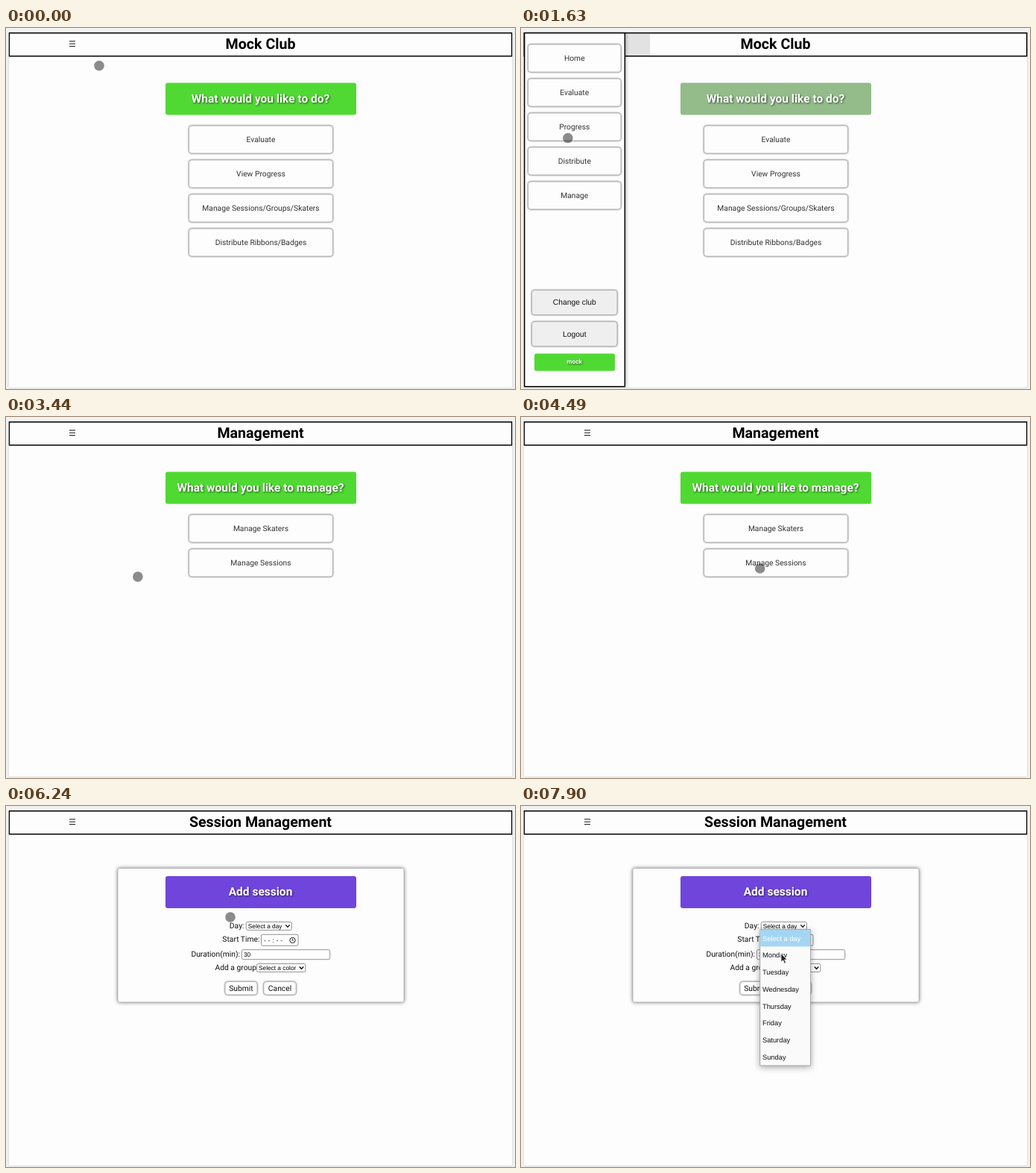
Recreate the animation shown at these times as an HTML page. Size 683x484 px, loop 8000 ms.

```html
<!DOCTYPE html>
<html lang="en">
<head>
<meta charset="utf-8">
<title>Session management</title>
<style>
html, body { margin: 0; height: 100%; overflow: hidden; background: #f2f2f2; }
svg { display: block; width: 100vw; height: 100vh; }
text { font-family: Roboto, sans-serif; text-rendering: geometricPrecision; white-space: pre; }
.ui { font-family: "Liberation Sans", Arial, sans-serif; }
.bold { font-weight: 700; }
.lit { filter: drop-shadow(1.2px 1.2px 1.2px rgba(0,0,0,.6)); }
.box { filter: drop-shadow(0 0 1.3px rgba(0,0,0,.5)); }
.panel { filter: drop-shadow(0 0 2.5px rgba(0,0,0,.5)); }
.list { filter: drop-shadow(0 2px 4px rgba(0,0,0,.35)); }
.dim { filter: blur(.55px) grayscale(.7); }
</style>
</head>
<body>
<svg id="stage" viewBox="0 0 683 484" preserveAspectRatio="none"></svg>
<script>
const GREEN = '#50d933', PURPLE = '#7045dc', PAPER = '#fdfdfd';
const LOOP = 8000;

const rect = (x, y, w, h, fill, more = '') =>
  `<rect x="${x}" y="${y}" width="${w}" height="${h}" fill="${fill}" ${more}/>`;

// y is the middle of the capitals
const text = (s, x, y, size, fill = '#333', cls = '', anchor = 'middle') =>
  `<text x="${x}" y="${y + size * .355}" font-size="${size}" fill="${fill}" class="${cls}" text-anchor="${anchor}">${s}</text>`;

const group = (id, body, more = '') => `<g id="${id}" ${more}>${body}</g>`;

const button = (s, x, y, w, h, fill = PAPER, ink = '#333', cls = '') =>
  rect(x, y, w, h, fill, 'rx="3.5" stroke="#a6a6a6" stroke-width=".8" class="box"') +
  text(s, x + w / 2, y + h / 2 - .2, 10.3, ink, cls);

const banner = (s, y, fill) =>
  rect(214, y, 256, 43, fill, 'rx="3"') + text(s, 341.5, y + 20.8, 15.5, '#fff', 'bold lit');

const header = title =>
  rect(4.3, 6.7, 674.4, 31, 'none', 'stroke="#000" stroke-width="1.5"') +
  text(title, 341.5, 21, 19.6, '#000', 'bold') +
  '<path d="M85 17.8h8M85 21.2h8M85 24.6h8" stroke="#111"/>';

const menuPage = (id, title, question, color, items) =>
  group(id, header(title) + banner(question, 73.5, color) +
    items.map((s, i) => button(s, 245.5, 131 + i * 46, 193, 37)).join(''));

const field = (x, y, w, h) =>
  rect(x, y, w, h, '#fff', 'rx="2" stroke="#777" stroke-width=".8"');

const select = (s, x, y, w) =>
  field(x, y, w, 11) + text(s, x + 2.5, y + 5.6, 8.3, '#000', 'ui', 'start') +
  `<path d="M${x + w - 8} ${y + 4}l2.7 3 2.7-3" fill="none" stroke="#000" stroke-width="1.3"/>`;

const label = (s, x, y) => text(s, x, y, 10.3, '#111', '', 'end');

const form = group('form',
  header('Session Management') +
  rect(150, 83.5, 384, 179.5, PAPER, 'rx="2.5" stroke="#aaa" stroke-width=".8" class="panel"') +
  banner('Add session', 94, PURPLE) +
  label('Day:', 319.5, 160) + select('Select a day', 322.3, 155.4, 61) +
  label('Start Time:', 340.5, 178.3) + field(342.5, 172.3, 49.5, 15) +
  `<g letter-spacing="2.9">${text('--:--', 346, 180, 8.3, '#000', 'ui', 'start')}</g>` +
  '<circle cx="384.5" cy="180" r="3.7" fill="none" stroke="#222"/><path d="M384.5 177.5v2.7l1.7 1" fill="none" stroke="#222" stroke-width=".9"/>' +
  label('Duration(min):', 314, 198.2) + field(316.4, 192.7, 118.3, 13) +
  text('30', 319, 199.3, 8.3, '#000', 'ui', 'start') +
  label('Add a group', 336, 216.7) + select('Select a color', 336.5, 211.5, 65.3) +
  button('Submit', 294, 235.5, 43, 17.5, PAPER, '#111') +
  button('Cancel', 345.8, 235.5, 43.4, 17.5, PAPER, '#111'));

const days = ['Select a day', 'Monday', 'Tuesday', 'Wednesday', 'Thursday', 'Friday', 'Saturday', 'Sunday'];
const list = group('list',
  rect(320.8, 165.6, 67.8, 182.4, '#fafafa', 'stroke="#999" stroke-width=".8" class="list"') +
  rect(321.2, 166, 67, 22.4, '#a4d6f3') +
  days.map((s, i) => text(s, 324, 177.3 + i * 22.75, 9.3, i ? '#111' : '#fff', 'ui', 'start')).join(''));

const side = group('side',
  rect(4.7, 6.7, 134.6, 474, PAPER, 'stroke="#000" stroke-width="1.4" class="panel"') +
  ['Home', 'Evaluate', 'Progress', 'Distribute', 'Manage'].map((s, i) => button(s, 9.5, 22 + i * 46, 124.5, 37)).join('') +
  group('pressed', button('Manage', 9.5, 206, 124.5, 37, '#a3cbe5', '#4a6578')) +
  button('Change club', 14.5, 351.5, 114.5, 33, '#efefef', '#111', 'ui') +
  button('Logout', 14.5, 393.7, 114.5, 33, '#efefef', '#111', 'ui') +
  rect(18, 436.5, 108, 23.3, GREEN, 'rx="2.5"') + text('mock', 71.7, 447, 8.4, '#fff', 'bold lit'));

const stage = document.getElementById('stage');
stage.innerHTML =
  '<clipPath id="clip"><path d="M3.5 5.5H679.5V482H3.5z"/></clipPath>' +
  rect(3.8, 6, 675.4, 476, PAPER, 'style="filter:drop-shadow(0 0 1px rgba(0,0,0,.2))"') +
  group('view',
    group('main',
      rect(5, 7.5, 168, 29.5, '#e2e2e2', 'id="hover"') +
      menuPage('home', 'Mock Club', 'What would you like to do?', GREEN,
        ['Evaluate', 'View Progress', 'Manage Sessions/Groups/Skaters', 'Distribute Ribbons/Badges']) +
      menuPage('manage', 'Management', 'What would you like to manage?', GREEN,
        ['Manage Skaters', 'Manage Sessions']) +
      menuPage('session', 'Session Management', 'What would you like to do?', PURPLE,
        ['Add Session', 'Edit Session', 'Assign Skaters to groups']) +
      form) + side, 'clip-path="url(#clip)"') +
  list +
  '<circle id="dot" r="6.8" fill="rgba(0,0,0,.45)"/>' +
  '<path id="arrow" d="M0 0v11.2l2.6-2.4 1.9 4.4 2-.9-1.9-4.2h3.5z" fill="#222" stroke="#fff" stroke-width=".8"/>';

const el = {};
for (const node of stage.querySelectorAll('[id]')) el[node.id] = node;

// start, end, number of steps, waypoints
const moves = [
  [90, 370, 4, [125, 50.5], [79, 23]],
  [960, 1720, 9, [79, 23], [59, 100], [64, 161]],
  [1810, 2380, 7, [64, 161], [68, 205], [66.5, 228]],
  [3060, 3810, 9, [66.5, 228], [165, 213], [272, 223]],
  [3910, 4190, 4, [272, 223], [321, 204]],
  [4490, 4490, 1, [321, 204], [320.7, 203]],
  [5180, 5650, 6, [320.7, 203], [301, 149]],
  [6340, 6920, 7, [301, 149], [338, 168]],
  [7020, 7110, 2, [338, 168], [346, 161]],
  [7610, 7900, 4, [345, 161], [349, 198]]
];

function pointer(t) {
  const move = moves.filter(m => t >= m[0]).pop();
  if (!move) return moves[0][3];
  const [start, end, steps, ...pts] = move;
  const step = t >= end ? steps : 1 + Math.floor((t - start) / (end - start) * (steps - 1));
  const u = step / steps * (pts.length - 1);
  const i = Math.min(Math.floor(u), pts.length - 2);
  return pts[i].map((v, k) => v + (pts[i + 1][k] - v) * (u - i));
}

function show(node, on) {
  node.style.display = on ? '' : 'none';
}

function draw(now) {
  const t = now % LOOP;
  const during = (a, b) => t >= a && t < b;
  show(el.home, t < 2770);
  show(el.manage, during(2770, 4790));
  show(el.session, during(4790, 6160));
  show(el.form, t >= 6160);
  show(el.list, t >= 7610);
  show(el.side, during(680, 2860));
  show(el.hover, during(680, 2770));
  show(el.pressed, t >= 2770);
  el.main.setAttribute('class', during(760, 2770) ? 'dim' : '');
  const slide = t < 760 ? -40 : t < 2770 ? 0 : -30;
  el.side.setAttribute('transform', `translate(${slide} 0)`);

  const at = `translate(${pointer(t)})`;
  el.dot.setAttribute('transform', at);
  el.arrow.setAttribute('transform', at);
  show(el.dot, t < 7610);
  show(el.arrow, t >= 7610);
  requestAnimationFrame(draw);
}
draw(0);
</script>
</body>
</html>
```
